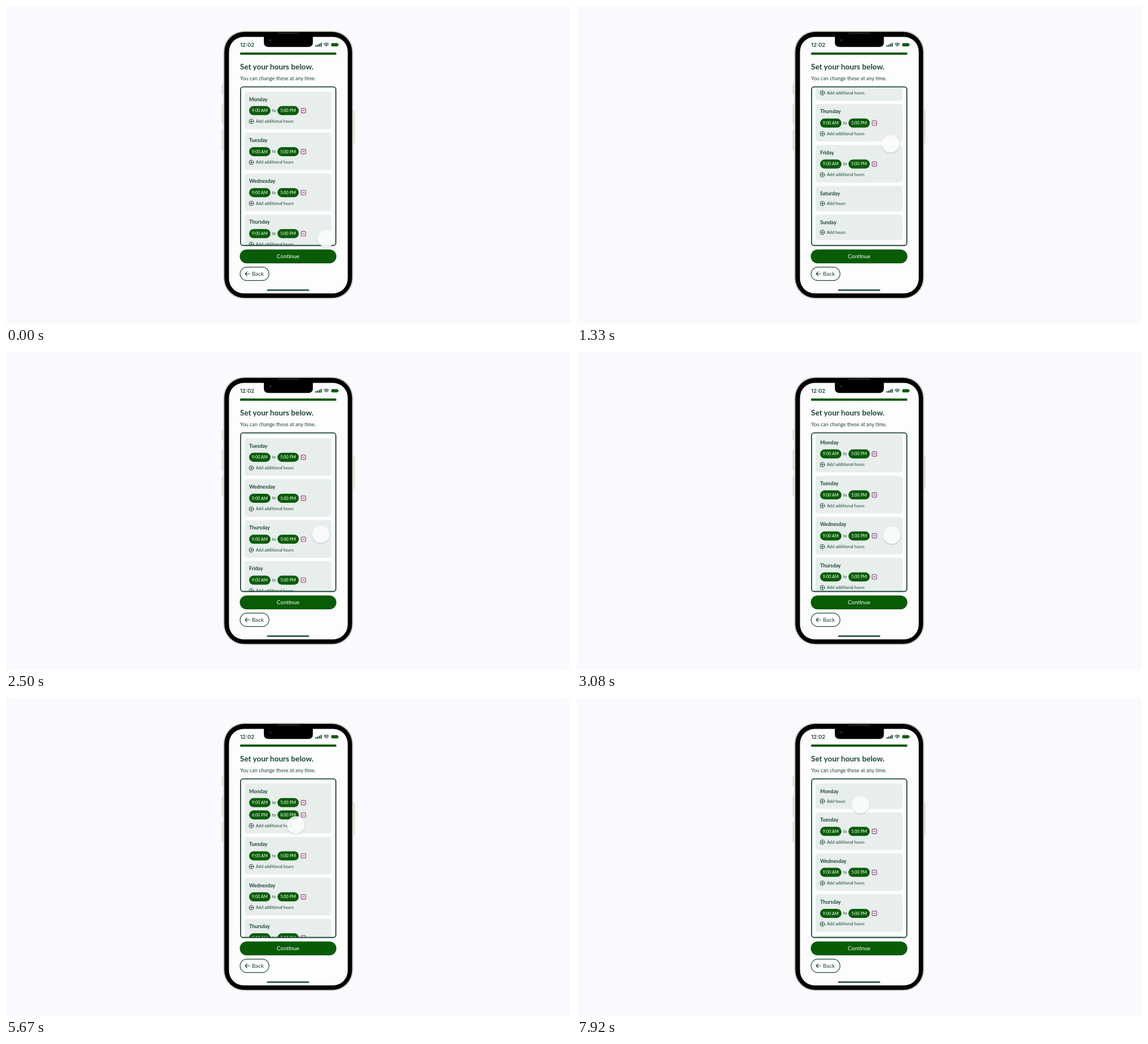
An HTML page for the animation above (8000 ms loop, 997 by 561 pixels).

```html
<!DOCTYPE html>
<html lang="en">
<head>
<meta charset="utf-8">
<title>Set your hours</title>
<style>
  html, body { margin: 0; width: 100%; height: 100%; overflow: hidden; background: #fafafe; }
  svg { display: block; width: 100%; height: 100%; }
  text { font-family: Lato, "Open Sans", sans-serif; fill: #1d4935; }
  .line { fill: none; stroke: #1d4935; stroke-linecap: round; stroke-linejoin: round; }
  .green { fill: #085c06; }
  .dark { fill: #1d4935; }
  .card { fill: #e7eeec; }
  .day { font-size: 8.9px; font-weight: 700; }
  .small { font-size: 7.3px; }
  .pill { font-size: 7.3px; fill: #fff; text-anchor: middle; }
  .minus { fill: none; stroke: #a33b88; stroke-width: 1.15; }
  #cursor { fill: #fcfcff; filter: drop-shadow(0 1.5px 1.3px rgba(40, 50, 60, .28)); }
</style>
</head>
<body>
<svg viewBox="0 0 997 561">
  <defs><clipPath id="listClip"><rect x="414.5" y="143.5" width="167" height="278.5" rx="3.5"/></clipPath></defs>

  <!-- Phone body -->
  <g fill="#dfddd6">
    <rect x="380.5" y="137" width="4" height="19" rx="1"/>
    <rect x="380.5" y="172" width="4" height="37" rx="1"/>
    <rect x="380.5" y="218" width="4" height="37" rx="1"/>
    <rect x="611.5" y="184" width="3.5" height="58" rx="1"/>
  </g>
  <rect x="383" y="43.5" width="230" height="473.5" rx="37" fill="#e3e1d9"/>
  <rect x="384.3" y="44.8" width="227.4" height="471" rx="36" fill="#aaa9a3"/>
  <rect x="385.4" y="45.8" width="225.2" height="469" rx="35"/>
  <rect x="393.5" y="54.5" width="209.5" height="452.5" rx="26" fill="#fdfdff"/>
  <path d="M455 53V64Q455 72.3 463.500 72.3H533Q541.500 72.3 541.500 64V53Z"/>
  <rect x="479" y="47.300" width="39" height="2" rx="1" fill="#242424"/>
  <circle cx="466.300" cy="60.500" r="2.600" fill="#11102c"/>
  <circle cx="466.300" cy="60.500" r="1" fill="#2d2b72"/>

  <!-- Status bar -->
  <text x="413" y="71.700" style="font:600 9.5px Inter, sans-serif">12:02</text>
  <g class="dark">
    <rect x="546" y="69" width="2.100" height="2.700" rx=".5"/>
    <rect x="549" y="68" width="2.100" height="3.700" rx=".5"/>
    <rect x="552" y="66.500" width="2.100" height="5.200" rx=".5"/>
    <rect x="555" y="65" width="2.100" height="6.700" rx=".5"/>
    <path d="M563.600 69.900Q565.200 68.600 566.800 69.900L565.200 71.600Z"/>
  </g>
  <path class="line" stroke-width="1.300" d="M561 67.200Q565.200 63.700 569.400 67.200M562.600 69Q565.200 66.800 567.800 69"/>
  <rect class="green" x="574" y="65.500" width="12" height="5.700" rx="1.400"/>
  <rect class="dark" x="586.500" y="67.200" width="1" height="2.200" rx=".5"/>

  <!-- Screen content -->
  <rect class="green" x="413" y="82" width="170" height="4" rx="1.500"/>
  <text x="413" y="112" font-size="13.500" font-weight="700">Set your hours below.</text>
  <text x="413" y="131.300" font-size="9">You can change these at any time.</text>
  <g clip-path="url(#listClip)"><g id="list"></g></g>
  <rect class="line" x="413.900" y="142.700" width="168.200" height="279.800" rx="4.500" stroke-width="1.800"/>
  <rect class="green" x="412.500" y="429.500" width="170.500" height="24.500" rx="12.250"/>
  <text x="497.800" y="445" font-size="9.900" style="fill:#fff" text-anchor="middle">Continue</text>
  <rect class="line" x="413.100" y="460.600" width="51" height="23.800" rx="11.900" stroke-width="1.200"/>
  <path class="line" stroke-width="1.100" d="M429.800 472.500H422M425.500 469L422 472.500L425.500 476"/>
  <text x="434" y="476" font-size="9.900">Back</text>
  <rect class="dark" x="460.500" y="500" width="74.500" height="2.500" rx="1.250"/>
  <circle id="cursor" r="15.500"/>
</svg>

<script>
const LOOP = 8000, STEP = 1000 / 12;
const DAYS = ['Monday', 'Tuesday', 'Wednesday', 'Thursday', 'Friday', 'Saturday', 'Sunday'];
const ROW = 21.6, GAP = 6, LIST_TOP = 151;

// Each key is [time, ...values]; the motion eases between rest points.
const SCROLL = [[170, 0], [1170, 195], [1409, 195], [3256, 0]];
const MONDAY_ROWS = [[4300, 1], [4550, 2], [6200, 2], [6450, 1], [7250, 1], [7500, 0]];
const CURSOR = [
  [170, 565, 410], [1170, 547, 243], [1500, 560, 243], [2600, 555.5, 323],
  [3200, 555.5, 323], [3950, 482, 203], [4700, 482, 203], [5600, 511.5, 224],
  [5700, 511.5, 224], [6100, 526, 209], [6600, 526, 209], [7000, 526, 187],
  [7450, 526, 187], [8000, 498.4, 188]
];
const TAPS = [4170, 6200, 7250];

const list = document.getElementById('list');
const cursor = document.getElementById('cursor');
const clamp = v => Math.max(0, Math.min(1, v));

function track(keys, t) {
  const next = keys.findIndex(key => key[0] > t);
  if (next === 0) return keys[0].slice(1);
  if (next < 0) return keys[keys.length - 1].slice(1);
  const a = keys[next - 1], b = keys[next];
  const u = (t - a[0]) / (b[0] - a[0]), eased = u * u * (3 - 2 * u);
  return a.slice(1).map((v, i) => v + (b[i + 1] - v) * eased);
}

function pill(x, y, label) {
  return `<rect class="green" x="${x}" y="${y - 8}" width="37.7" height="16" rx="8"/>
    <text class="pill" x="${x + 18.8}" y="${y + 2.6}">${label}</text>`;
}

function hoursRow(y, from, to, opacity) {
  return `<g opacity="${opacity}">${pill(429, y, from)}${pill(479, y, to)}
    <text class="small" x="469.700" y="${y + 2.5}">to</text>
    <rect class="minus" x="520.800" y="${y - 4}" width="8" height="8" rx="1.300"/>
    <path class="minus" d="M522.700 ${y}h4.200"/></g>`;
}

function card(day, top, rows) {
  const addY = top + 31 + ROW * rows;
  let out = `<rect class="card" x="421" y="${top}" width="153.500" height="${44.7 + ROW * rows}" rx="5"/>
    <text class="day" x="429" y="${top + 16.5}">${day}</text>`;
  for (let i = 0; i < rows; i++) {
    const [from, to] = i ? ['6:00 PM', '8:00 PM'] : ['9:00 AM', '5:00 PM'];
    out += hoursRow(top + 33.6 + ROW * i, from, to, clamp(rows - i));
  }
  return out + `<circle class="line" cx="433" cy="${addY}" r="4" stroke-width="1"/>
    <path class="line" stroke-width="1" d="M431 ${addY}h4M433 ${addY - 2}v4"/>
    <text class="small" x="441" y="${addY + 2.5}">${rows < .5 ? 'Add hours' : 'Add additional hours'}</text>`;
}

function draw(t) {
  const [scroll] = track(SCROLL, t);
  const [mondayRows] = track(MONDAY_ROWS, t);
  let top = LIST_TOP - scroll;
  list.innerHTML = DAYS.map((day, i) => {
    const rows = i === 0 ? mondayRows : i < 5 ? 1 : 0;
    const markup = card(day, top, rows);
    top += 44.7 + ROW * rows + GAP;
    return markup;
  }).join('');

  const [x, y] = track(CURSOR, t);
  const press = Math.max(...TAPS.map(tap => clamp(1 - Math.abs(t - tap) / 220)));
  cursor.setAttribute('cx', x);
  cursor.setAttribute('cy', y);
  cursor.setAttribute('opacity', .88 - .38 * press);
}

const start = performance.now();
function tick() {
  const t = (performance.now() - start) % LOOP;
  draw(Math.floor((t + 5) / STEP) * STEP % LOOP);
  requestAnimationFrame(tick);
}
tick();
</script>
</body>
</html>
```
